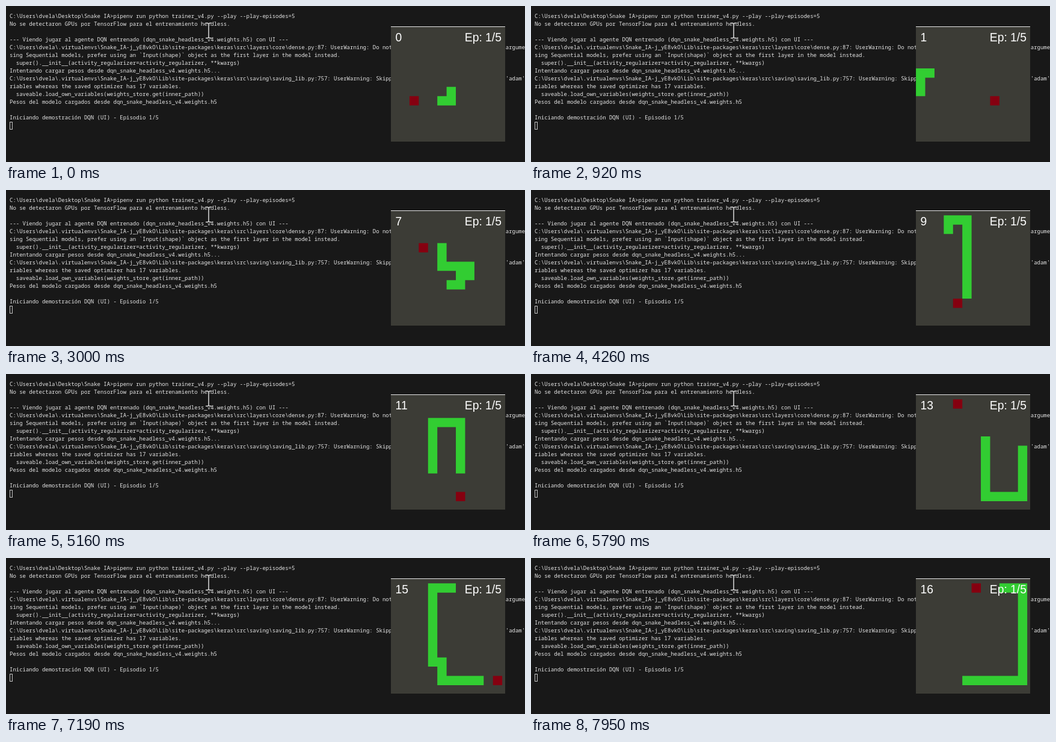
Animation of 863x260 px, one loop 8000 ms. Source, as an HTML page with a canvas:

```html
<!DOCTYPE html>
<html lang="es">
<head>
<meta charset="utf-8">
<title>Snake DQN</title>
<style>
html, body { margin: 0; width: 100%; height: 100%; overflow: hidden; background: #181818; }
canvas { display: block; }
</style>
</head>
<body>
<canvas id="stage" width="863" height="260"></canvas>
<script>
const ctx = document.getElementById('stage').getContext('2d');

const LOOP = 8000;
const HOME = String.raw`C:\Users\dvela`;
const KERAS = HOME + String.raw`\.virtualenvs\Snake_IA-j_yE8vkO\Lib\site-packages\keras\src`;
const LINES = [
  HOME + String.raw`\Desktop\Snake IA>pipenv run python trainer_v4.py --play --play-episodes=5`,
  'No se detectaron GPUs por TensorFlow para el entrenamiento headless.',
  '',
  '--- Viendo jugar al agente DQN entrenado (dqn_snake_headless_v4.weights.h5) con UI ---',
  KERAS + String.raw`\layers\core\dense.py:87: UserWarning: Do not pass an ` +
    '`input_shape`/`input_dim` argument to a layer. When u',
  'sing Sequential models, prefer using an `Input(shape)` object as the first layer in the model instead.',
  '  super().__init__(activity_regularizer=activity_regularizer, **kwargs)',
  'Intentando cargar pesos desde dqn_snake_headless_v4.weights.h5...',
  KERAS + String.raw`\saving\saving_lib.py:757: UserWarning: Skipping variable loading for optimizer 'adam', because`,
  'riables whereas the saved optimizer has 17 variables.',
  '  saveable.load_own_variables(weights_store.get(inner_path))',
  'Pesos del modelo cargados desde dqn_snake_headless_v4.weights.h5',
  '',
  'Iniciando demostración DQN (UI) - Episodio 1/5',
];

// Snake route as runs of direction + length, and the food in order of appearance.
const START = [6, 6];
const ROUTE = 'D1 L6 U3 R8 D3 L8 U5 R5 D3 R3 D1 L1 D1 L6 U4 R2 U3 R2 D9 L1 U7 R3 D8 R4 U10 L7 D8 R1 D2 R6 U10 L2';
const FOODS = [[2, 7], [8, 7], [2, 7], [0, 4], [5, 4], [8, 5], [6, 7], [3, 3], [5, 8],
  [4, 9], [7, 2], [7, 10], [11, 5], [4, 0], [5, 8], [11, 10], [6, 0]];
const STEP = { U: [0, -1], D: [0, 1], L: [-1, 0], R: [1, 0] };

const path = [START];
for (const run of ROUTE.split(' ')) {
  const [dx, dy] = STEP[run[0]];
  for (let i = +run.slice(1); i > 0; i--) {
    const [x, y] = path[path.length - 1];
    path.push([x + dx, y + dy]);
  }
}

// Path index at which each food is eaten.
const meals = [];
let reached = 2;
for (const [x, y] of FOODS) {
  reached = path.findIndex((cell, i) => i > reached && cell[0] === x && cell[1] === y);
  if (reached < 0) break;
  meals.push(reached);
}

// The screen refreshes in bursts of 12; two refreshes show no move.
const BURSTS = [500, 1340, 2160, 3000, 3840, 4680, 5510, 6350, 7190, LOOP];
const STALLS = [15, 21];

function refreshAt(t) {
  if (t < BURSTS[0]) return 0;
  const b = BURSTS.findIndex(start => t < start) - 1;
  const length = (BURSTS[b + 1] - BURSTS[b]) / 12;
  return 12 * b + 1 + Math.min(11, Math.floor((t - BURSTS[b] + 6) / length));
}

function headAt(t) {
  const refresh = refreshAt(t);
  const active = refresh - STALLS.filter(s => refresh >= s).length;
  return Math.min(path.length - 1, 2 + Math.floor((4 * active + 1.5) / 3));
}

function drawTerminal() {
  ctx.fillStyle = '#181818';
  ctx.fillRect(0, 0, 863, 260);
  ctx.fillStyle = '#e6e6e6';
  ctx.font = '500 8.99px "Noto Sans Mono", monospace';
  LINES.forEach((line, i) => ctx.fillText(line, 6, 20 + 13 * i));
  ctx.strokeStyle = '#c4c4c4';
  ctx.lineWidth = 1;
  ctx.strokeRect(6.5, 193.5, 4, 12);
}

function drawPointer() {
  const beam = new Path2D('M332 28.5H335.5L337 30L338.5 28.5H342M337 30V52M332 53.5H335.5L337 52L338.5 53.5H342');
  for (const [color, width] of [['#181818', 3.4], ['#dcdcdc', 1.5]]) {
    ctx.strokeStyle = color;
    ctx.lineWidth = width;
    ctx.stroke(beam);
  }
}

function fillCells(cells, color) {
  const size = 15.42;
  ctx.fillStyle = color;
  ctx.beginPath();
  for (const [x, y] of cells) ctx.rect(640.1 + x * size, 42.3 + y * size, size, size);
  ctx.fill();
}

function drawGame(t) {
  const head = headAt(t);
  const score = meals.filter(i => i <= head).length;
  ctx.fillStyle = '#3c3c36';
  ctx.fillRect(640, 34, 190, 192);
  ctx.fillStyle = '#e8e8e8';
  ctx.fillRect(640, 34, 190, 1);
  fillCells(path.slice(head - score - 2, head + 1), '#32cd32');
  fillCells([FOODS[score]], '#850010');
  ctx.fillStyle = '#ffffff';
  ctx.font = '19.3px "Liberation Sans", Arial, sans-serif';
  ctx.fillText(score, 647.6, 59);
  ctx.fillText('Ep: 1/5', 762.8, 59);
}

const begin = performance.now();

function frame() {
  drawTerminal();
  drawPointer();
  drawGame((performance.now() - begin) % LOOP);
  requestAnimationFrame(frame);
}

frame();
</script>
</body>
</html>
```
